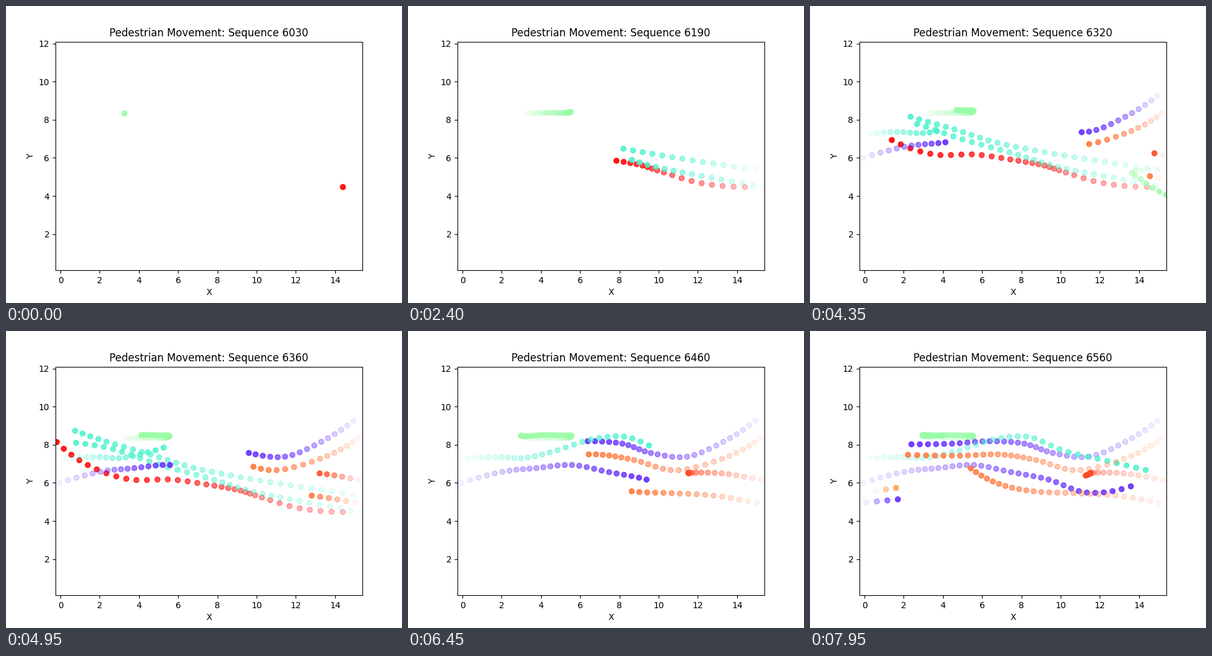
A matplotlib script for the animation above (8 s loop, 640 px wide and 480 px high).

```python
import numpy as np
import matplotlib.pyplot as plt
from matplotlib.animation import FuncAnimation

INTERVAL = 50          # ms per drawn frame
TICKS_PER_STEP = 3
FRAMES = 160
FIRST_SEQUENCE = 6030
LAST_STEP = (FRAMES - 1) // TICKS_PER_STEP
OLDEST_ALPHA, NEWEST_ALPHA = 0.07, 0.9

# Positions on the rainbow colour map
RED, VERMILION, ORANGE, AMBER = 1.0, 0.9, 0.84, 0.78
GREEN, CYAN, PURPLE = 0.55, 0.4, 0.055

fig, ax = plt.subplots(figsize=(6.4, 4.8), dpi=100)
ax.set(xlim=(-0.255, 15.395), ylim=(0.10, 12.10), xlabel="X", ylabel="Y")
title = ax.set_title("")
dots = ax.scatter([], [])
walkers = []


def to_data(points):
    """Convert stage pixels (origin top left) to axis units."""
    return (points - [88.6, 61.6]) / [31.69, -30.8] + [0, 12]


def glide(points, count):
    """Sample a smooth curve that passes its points at equal time intervals."""
    slopes = np.gradient(points, axis=0, edge_order=min(2, len(points) - 1))
    u = np.linspace(0, len(points) - 1, count)
    i = np.minimum(u.astype(int), len(points) - 2)
    t = (u - i)[:, None]
    ease = t * t * (3 - 2 * t)
    return (points[i] * (1 - ease) + points[i + 1] * ease
            + t * (1 - t) * ((1 - t) * slopes[i] - t * slopes[i + 1]))


def walker(hue, first, *points, last=LAST_STEP, oldest=OLDEST_ALPHA):
    """Add a pedestrian present from step first to last."""
    path = glide(to_data(np.array(points, float)), last - first + 1)
    walkers.append((first, path, plt.cm.rainbow(hue), oldest))


walker(GREEN, 0, (192, 174.5), (227, 173.5), (258, 173.5), (264, 170), (247, 169.5),
       (219, 169), (190, 171), (184, 169), (216, 170.5))
walker(RED, 0, (545, 293.5), (473, 287), (411, 269), (376, 258), (331, 250),
       (268, 241), (199, 240.5), (134.5, 218.5), (82.5, 180.5), last=33, oldest=0.23)
walker(CYAN, 2, (575.5, 294), (483, 277), (401, 261), (330, 239.5), (247, 216.5),
       (166, 190), (84, 180), last=35)
walker(CYAN, 3, (562, 265), (471.5, 252), (385, 238), (303.5, 222), (229.5, 199),
       (154, 177), (89, 153), last=35)
walker(PURPLE, 18, (86.5, 246.5), (153, 228.5), (208, 222.5), (265.5, 217.5),
       (325.5, 229), (386, 241), (448, 262), (519, 252))
walker(PURPLE, 18, (562, 146), (510, 180), (451.5, 204), (393, 198), (347, 183),
       (291, 179), (230, 183), (164.5, 184))
walker(CYAN, 19, (97.5, 207), (144, 204.5), (188.5, 206), (239, 194.5), (296, 176.5),
       (353, 172), (411, 194.5), (477, 210), (543, 225.5))
walker(ORANGE, 19, (569, 174), (512, 206), (433.5, 226), (366, 209.5), (308, 200.5),
       (238.5, 202.5), (159, 201))
walker(GREEN, 19, (561, 266), (536.5, 266.5), (520.5, 270.5), (535, 281), (554, 295),
       (576, 306), last=29)
walker(VERMILION, 28, (571, 242), (507.5, 231), (459, 230), (454, 231), (451, 232.5),
       (446, 234.5))
walker(ORANGE, 28, (564, 279), (494.5, 267), (426.5, 263), (362, 260), (306, 248),
       (260.5, 223))
walker(PURPLE, 50, (91.5, 278), (142.5, 273))
walker(AMBER, 51, (107, 259.5), (139.5, 254.5))


def draw(frame):
    step = frame // TICKS_PER_STEP
    places, colors = [], []
    for first, path, color, oldest in walkers:
        count = step - first + 1
        if not 0 < count <= len(path):
            continue
        trail = np.tile(color, (count, 1))
        trail[:, 3] = np.linspace(NEWEST_ALPHA, oldest, count)[::-1]
        places.append(path[:count])
        colors.append(trail)
    dots.set_offsets(np.vstack(places))
    dots.set_facecolors(np.vstack(colors))
    dots.set_edgecolors(np.vstack(colors))
    title.set_text(f"Pedestrian Movement: Sequence {FIRST_SEQUENCE + 10 * step}")
    return dots, title


animation = FuncAnimation(fig, draw, frames=FRAMES, interval=INTERVAL,
                          init_func=lambda: draw(0), repeat=True, repeat_delay=0)
plt.show()
```
